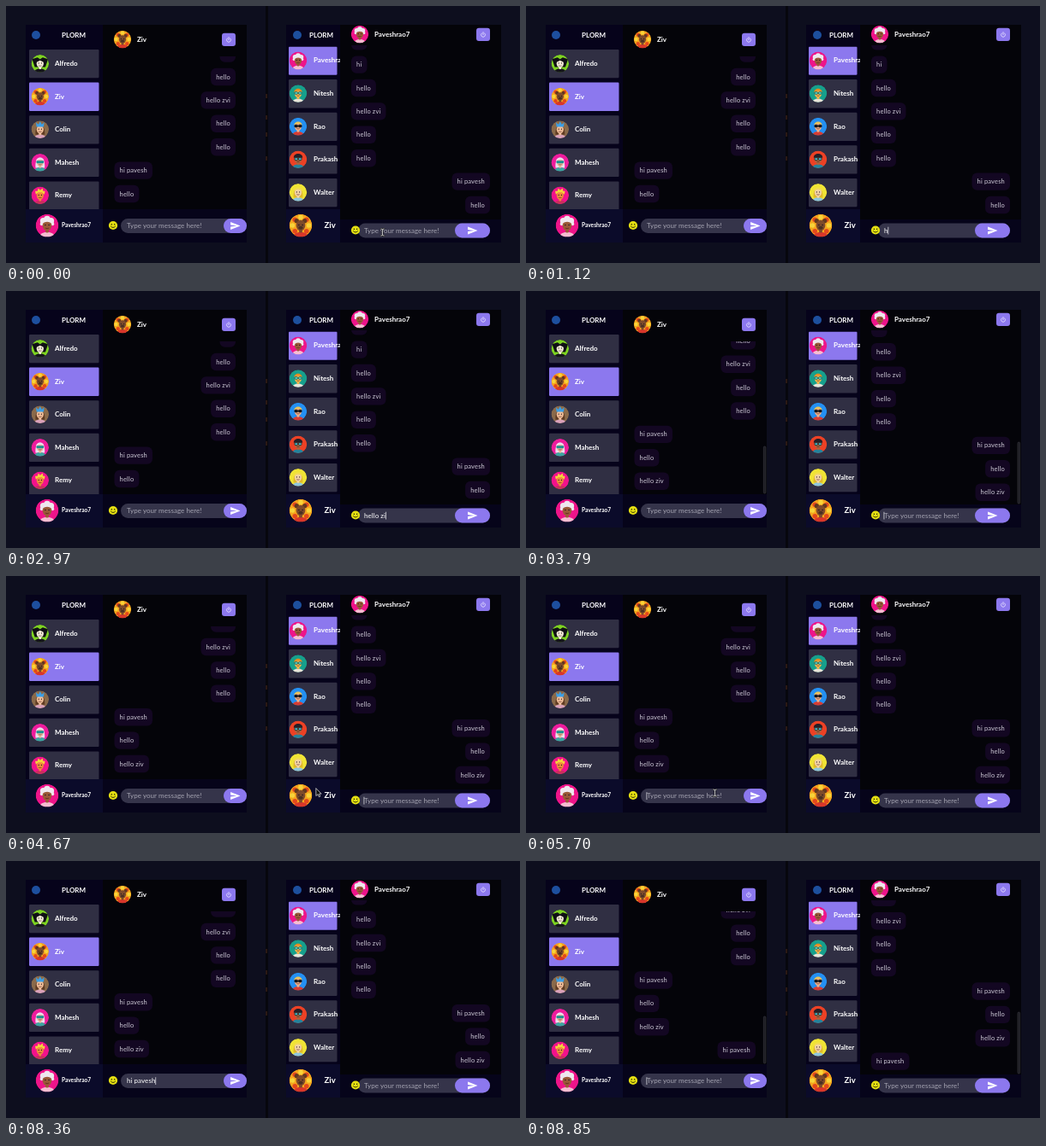
Recreate the animation shown at these times as an HTML page. Size 600 by 301 pixels, loop 8.88 s.

```html
<!DOCTYPE html>
<html lang="en">
<head>
<meta charset="utf-8">
<title>Two chat windows</title>
<style>
  html, body { margin: 0; width: 100%; height: 100%; overflow: hidden; background: #0d0e1e; }
  svg { display: block; width: 600px; height: 301px; }
  text { font-family: Lato, "Open Sans", sans-serif; fill: #fff; white-space: pre; }
  .name { font-weight: 700; font-size: 8px; }
  .msg { font-size: 7.5px; letter-spacing: .15px; fill: #cdcad6; }
  .field { font-size: 8px; letter-spacing: .05px; }
  .hint { fill: #a3a2b0; }
</style>
</head>
<body>
<svg id="stage" viewBox="0 0 600 301"></svg>
<script>
const LOOP = 8880, PITCH = 27.4;
const SEND = [3480, 8520];
const HINT = 'Type your message here!';

// from 0: left window's user, 1: right window's user
const messages = [
  ['hi', 0], ['hi', 0], ['hello', 0], ['hello zvi', 0], ['hello', 0], ['hello', 0],
  ['hi pavesh', 1], ['hello', 1], ['hello ziv', 1, SEND[0]], ['hi pavesh', 0, SEND[1]]
];

const typing = [
  { text: 'hi pavesh', keys: [6150, 6350, 6550, 6750, 6900, 7100, 7350, 7650, 7900], sent: SEND[1], focus: [5500, LOOP] },
  { text: 'hello ziv', keys: [1080, 1220, 1370, 1500, 1650, 1850, 2600, 2800, 3150], sent: SEND[0], focus: [600, 5500] }
];

const rect = (x, y, w, h, fill, r = 0, more = '') =>
  `<rect x="${x}" y="${y}" width="${w}" height="${h}" rx="${r}" fill="${fill}" ${more}/>`;
const circle = (x, y, r, fill) => `<circle cx="${x}" cy="${y}" r="${r}" fill="${fill}"/>`;
const path = (d, fill) => `<path d="${d}" fill="${fill}"/>`;
const line = (d, color, w) =>
  `<path d="${d}" fill="none" stroke="${color}" stroke-width="${w}" stroke-linecap="round" stroke-linejoin="round"/>`;
const label = (x, y, s, cls = 'name', more = '') => `<text class="${cls}" x="${x}" y="${y}" ${more}>${s}</text>`;

// Avatars live in a circle of radius 10
const cap = 'M-4.4-1C-5-7 5-7 4.4-1C2.5-4-2.5-4-4.4-1Z';
const long = 'M-5.2 6C-6.5-9 6.5-9 5.2 6Z';
const tufts = circle(-3.4, -4, 2.7, '#eee8ee') + circle(0, -5.5, 2.9, '#eee8ee') +
  circle(3.4, -4, 2.7, '#eee8ee') + circle(-4.6, -1.4, 1.6, '#eee8ee') + circle(4.6, -1.4, 1.6, '#eee8ee');
const shades = (c, glass) => rect(-4, -1.8, 3.6, 2.6, glass, 1, `stroke="${c}" stroke-width=".8"`) +
  rect(.4, -1.8, 3.6, 2.6, glass, 1, `stroke="${c}" stroke-width=".8"`);

let petals = '';
for (let i = 0; i < 8; i++) {
  const a = i * Math.PI / 4;
  petals += circle(7.2 * Math.cos(a), 7.2 * Math.sin(a), 2.1, i % 2 ? '#e3471d' : '#f7d43a');
}

const avatars = {
  wings: { bg: '#7ed321', skin: '#f1ead6', shirt: '#15151a', back: path('M-9-5L-3-7L0-5L3-7L9-5L6 4H-6Z', '#101014'),
    front: path('M-4-1.5L-4-5H4V-1.5L0-3.6Z', '#101014') },
  bear: { bg: '#f5a51d', skin: '#7d4a2b', shirt: '#d8362a', back: petals + circle(-3.5, -4, 2, '#63381f') + circle(3.5, -4, 2, '#63381f'),
    front: `<ellipse cx="0" cy="2" rx="2" ry="1.5" fill="#493022"/>` },
  crown: { bg: '#8a6a4a', skin: '#eebc98', shirt: '#d9a1ba', back: path(long, '#603b22'),
    front: path('M-4-3L-4.7-8L-2-5.8L0-9L2-5.8L4.7-8L4-3Z', '#3c9fe6') },
  mask: { bg: '#ee1c9c', skin: '#e9b79c', shirt: '#39a7a0', back: path(long, '#e8e1ee'),
    front: path(cap, '#e8e1ee') + rect(-4.2, -1.9, 8.4, 2.8, '#188e92', 1) },
  flame: { bg: '#f2128b', skin: '#ee8a3c', shirt: '#c9305c', back: '',
    front: path('M-4.8-1L-5.6-5L-3-5L-2-8L0-5.8L3-8L3.3-5L5.6-5L4.8-1L2-3.4H-2Z', '#f3d53a') },
  tufts: { bg: '#ee1489', skin: '#9a5a38', shirt: '#f6bcd1', back: tufts, front: path(cap, '#eee8ee') },
  teal: { bg: '#16a08c', skin: '#f0b64e', shirt: '#e8e4d8', back: '', front: path(cap, '#e58a23') + shades('#0c5f62', '#5fd0bd') },
  cool: { bg: '#2490f2', skin: '#eeb08a', shirt: '#d53d34', back: '', front: path(cap, '#e8c45a') + shades('#111', '#15151c') },
  pilot: { bg: '#ec4125', skin: '#a9633d', shirt: '#23839d', back: '',
    front: path('M-5-1.8C-5.4-8 5.4-8 5-1.8Z', '#251f27') + shades('#222', '#47c0cf') },
  blonde: { bg: '#f0e435', skin: '#f3d3a5', shirt: '#8ec6dc', back: path(long, '#e0b82c'), front: path(cap, '#f4da55') }
};

function avatar(id, x, y, r) {
  const a = avatars[id];
  return `<g transform="translate(${x} ${y}) scale(${r / 10})" clip-path="url(#round)">` +
    circle(0, 0, 10, a.bg) + a.back +
    path('M-7 11C-7 4 7 4 7 11Z', a.shirt) + rect(-1.4, 3, 2.8, 3.4, a.skin, 1) +
    `<ellipse cx="0" cy="0" rx="4" ry="4.7" fill="${a.skin}"/>` +
    circle(-1.6, -.4, .6, '#201820') + circle(1.6, -.4, .6, '#201820') +
    line('M-1.3 2.5Q0 3.3 1.3 2.5', '#5a2424', .6) + a.front + '</g>';
}

const wins = [
  { x: 23, right: 281, split: 113, logo: 35, title: 65, cardX: 27, cardW: 81.5, cardY: 51, pic: 39.8, nameX: 57, on: 1,
    contacts: [['Alfredo', 'wings'], ['Ziv', 'bear'], ['Colin', 'crown'], ['Mahesh', 'mask'], ['Remy', 'flame']],
    me: ['Paveshrao7', 'tufts', 48, 65, 6.6], peer: ['Ziv', 'bear'], headY: 39, headX: 136, headName: 153, power: 260,
    top: 59, foot: 238, inL: 126.5, inR: 268, first: 28.2, inputY: 257.5, emoji: 125, pill: 134, pillR: 281, btn: 254, textX: 141,
    bar: [277.3, 182, 55] },
  { x: 327, right: 578, split: 390, logo: 340, title: 354, cardX: 330, cardW: 56.5, cardY: 47.5, pic: 341, nameX: 359, on: 0,
    contacts: [['Paveshrao7', 'tufts'], ['Nitesh', 'teal'], ['Rao', 'cool'], ['Prakash', 'pilot'], ['Walter', 'blonde']],
    me: ['Ziv', 'bear', 344, 371.5, 9.6], peer: ['Paveshrao7', 'tufts'], headY: 33, headX: 413, headName: 430, power: 557,
    top: 46, foot: 250, inL: 403, inR: 565, first: 41.2, inputY: 263, emoji: 408, pill: 411, pillR: 565, btn: 524, textX: 418,
    bar: [574, 177, 72] }
];

function windowMarkup(w, n) {
  const iy = w.inputY;
  let s = `<clipPath id="side${n}">${rect(w.x, 47.5, w.split - w.x, 190.5, '#000')}</clipPath>` +
    `<clipPath id="chat${n}">${rect(w.split, w.top, w.right - w.split, w.foot - w.top, '#000')}</clipPath>`;
  s += rect(w.x, 22, w.right - w.x, 255, '#040409') + rect(w.x, 22, w.split - w.x, 255, '#06031b');
  s += circle(w.logo, 34, 5, '#1d4f9e') + label(w.title, 36.9, 'PLORM');

  s += `<g clip-path="url(#side${n})">`;
  w.contacts.forEach(([name, id], i) => {
    const y = w.cardY + i * 38.6;
    s += rect(w.cardX, y, w.cardW, 33.3, i === w.on ? '#8c78ee' : '#302f43', 1.2) +
      avatar(id, w.pic, y + 16.4, 10.3) + label(w.nameX, y + 18.9, name);
  });
  s += '</g>';

  const [me, mePic, px, nx, size] = w.me;
  s += rect(w.x, 238, w.split - w.x, 39, '#0b0b2a') + avatar(mePic, px, 257, 13.3) +
    label(nx, 257 + size * .35, me, 'name', `style="font-size:${size}px"`);

  s += avatar(w.peer[1], w.headX, w.headY, 10.3) + label(w.headName, w.headY + 2.8, w.peer[0]);
  s += rect(w.power - 8, w.headY - 7.3, 16, 15.4, '#8c78ee', 3) +
    `<g transform="translate(${w.power} ${w.headY + .6})">` +
    line('M-1.7-1.7A2.5 2.5 0 1 0 1.7-1.7M0-3V0', '#ece8ff', .8) + '</g>';

  s += `<g clip-path="url(#chat${n})"><g id="list${n}"></g></g>`;
  s += rect(...w.bar.slice(0, 2), 2.6, w.bar[2], '#1c1c22', 1.3, `id="bar${n}" stroke="#45454c" stroke-width=".5"`);

  s += rect(w.split, w.foot, w.right - w.split, 277 - w.foot, '#06041a') +
    rect(w.pill, iy - 8.4, w.pillR - w.pill, 16.8, '#35344a', 8.4) +
    rect(w.btn, iy - 8.4, w.pillR - w.btn, 16.8, '#8c78ee', 8.4) +
    `<g transform="translate(${(w.btn + w.pillR) / 2} ${iy})">` +
    path('M-5.4-4.6L6 0L-5.4 4.6V1.1L2 0L-5.4-1.1Z', '#fff') + '</g>' +
    circle(w.emoji, iy - .5, 5.1, '#e5e012') +
    `<g transform="translate(${w.emoji} ${iy - .5})">` + circle(-1.7, -1.2, .75, '#222006') + circle(1.7, -1.2, .75, '#222006') +
    line('M-2.5 1.2Q0 4 2.5 1.2', '#222006', .9) + '</g>';
  s += label(w.textX, iy + 2.6, HINT, 'field hint', `id="field${n}"`) +
    rect(w.textX, iy - 4.3, .7, 8.8, '#f0f0f4', 0, `id="caret${n}"`);
  return s;
}

const stage = document.getElementById('stage');
const $ = id => document.getElementById(id);
const beam = 'M-1.8-4Q0-4 0-3Q0-4 1.8-4M0-3V3M-1.8 4Q0 4 0 3Q0 4 1.8 4';

stage.innerHTML = `<clipPath id="round">${circle(0, 0, 10, '#000')}</clipPath>` +
  rect(0, 0, 600, 301, '#0d0e1e') + rect(303, 0, 3, 301, '#07070d') +
  [103, 128, 148, 176].map(y => rect(303.6, y, .9, 5, '#56301f')).join('') +
  wins.map(windowMarkup).join('') +
  `<g id="mouse"><g id="beam">${line(beam, '#111', 1.9)}${line(beam, '#e8e8ea', .8)}</g>` +
  `<path id="arrow" d="M0 0V9L2.1 7.1L3.5 10.2L4.9 9.6L3.6 6.6H6.3Z" fill="#111" stroke="#eee" stroke-width=".7"/></g>`;

wins.forEach((w, n) => {
  $('list' + n).innerHTML = messages.map(([s], i) =>
    `<g id="m${n}-${i}">${rect(0, -10.2, 10, 20.4, '#130722', 6)}${label(6.1, 2.5, s, 'msg')}</g>`).join('');
  messages.forEach(([, from], i) => {
    const g = $(`m${n}-${i}`), width = g.lastChild.getComputedTextLength() + 12.2;
    g.firstChild.setAttribute('width', width);
    const x = from === n ? w.inR - width : w.inL;
    g.setAttribute('transform', `translate(${x} ${w.first + i * PITCH})`);
  });
});

const clamp = v => Math.max(0, Math.min(1, v));
const ease = u => u < .5 ? 2 * u * u : 1 - 2 * (1 - u) * (1 - u);
const show = (el, on) => el.setAttribute('visibility', on ? 'visible' : 'hidden');

function drawInput(n, t) {
  const { text, keys, sent, focus } = typing[n], w = wins[n];
  const field = $('field' + n), caret = $('caret' + n);
  const count = t < sent ? keys.filter(k => k <= t).length : 0;
  const value = text.slice(0, count);
  field.textContent = value || HINT;
  field.setAttribute('class', value ? 'field' : 'field hint');
  caret.setAttribute('x', w.textX + (value ? field.getComputedTextLength() : -.4));
  // Blinking restarts with each key press
  const last = Math.max(focus[0], ...[...keys, sent].filter(k => k <= t));
  show(caret, t >= focus[0] && t < focus[1] && (t - last) % 1000 < 500);
}

function drawMouse(t) {
  const u = ease(clamp((t - 4250) / 1000));
  const x = 439.5 - 219 * u, y = 265 - 11 * u - 14 * Math.sin(Math.PI * u);
  const over = wins.some(w => x > w.pill && x < w.btn && Math.abs(y - w.inputY) < 8.4);
  $('mouse').setAttribute('transform', `translate(${x} ${y})`);
  const on = t < 1080 || (t > 4200 && t < 6150);
  show($('beam'), on && over);
  show($('arrow'), on && !over);
}

function draw(t) {
  const shift = PITCH * SEND.reduce((sum, s) => sum + ease(clamp((t - s) / 400)), 0);
  const bar = Math.max(...SEND.map(s => t < s ? 0 : 1 - clamp((t - s - 820) / 200)));
  wins.forEach((w, n) => {
    $('list' + n).setAttribute('transform', `translate(0 ${-shift})`);
    $('bar' + n).setAttribute('opacity', bar);
    messages.forEach(([, , at = 0], i) => show($(`m${n}-${i}`), t >= at));
    drawInput(n, t);
  });
  drawMouse(t);
}

const start = performance.now();
function tick() {
  draw((performance.now() - start) % LOOP);
  requestAnimationFrame(tick);
}
tick();
</script>
</body>
</html>
```
